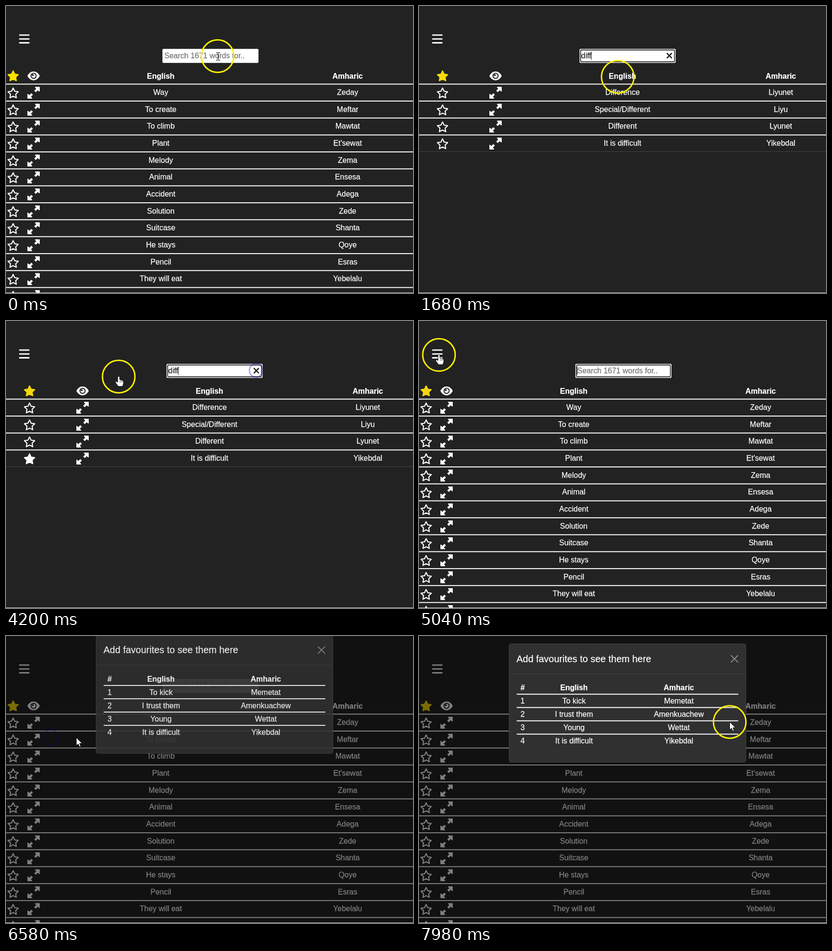
Animation of 856x604 px, one loop 8000 ms. Source, as an HTML page with a canvas:

```html
<!DOCTYPE html>
<html lang="en">
<head>
<meta charset="utf-8">
<title>Word list</title>
<style>
  html, body { margin: 0; width: 100%; height: 100%; overflow: hidden; background: #222; }
  canvas { display: block; }
</style>
</head>
<body>
<canvas id="stage" width="856" height="604"></canvas>
<script>
const c = document.getElementById('stage').getContext('2d');
const LOOP = 8000, STEP = 140, ROW = 35.67, FONT = '"Liberation Sans", Arial, sans-serif';

const allWords = [
  ['Way', 'Zeday'], ['To create', 'Meftar'], ['To climb', 'Mawtat'], ['Plant', "Et'sewat"],
  ['Melody', 'Zema'], ['Animal', 'Ensesa'], ['Accident', 'Adega'], ['Solution', 'Zede'],
  ['Suitcase', 'Shanta'], ['He stays', 'Qoye'], ['Pencil', 'Esras'], ['They will eat', 'Yebelalu'], ['', '']
];
const foundWords = [
  ['Difference', 'Liyunet'], ['Special/Different', 'Liyu'], ['Different', 'Lyunet'], ['It is difficult', 'Yikebdal']
];
const favourites = [
  ['To kick', 'Memetat'], ['I trust them', 'Amenkuachew'], ['Young', 'Wettat'], ['It is difficult', 'Yikebdal']
];
const menuItems = ['Hide Favourites', 'Hide Expander', 'Add Words', 'Favourites', 'Random Word', 'Quiz'];

// Column centres: star, expander, English, Amharic
const wide = [15, 58, 325.5, 718.5], narrow = [49.5, 161, 428, 761];

// Pointer path: time, x, y
const path = [
  [0, 445, 105.5], [140, 445, 105.5], [420, 447, 121], [700, 447, 121], [1120, 418, 149], [1680, 418, 149],
  [2000, 330, 110], [2380, 70, 240], [2600, 53, 284], [2660, 53, 284], [2800, 60, 271], [3100, 200, 180],
  [3640, 500, 83], [3900, 526, 104], [4060, 526, 104], [4200, 237, 117], [4620, 60, 80], [4900, 42, 73],
  [5240, 42, 69], [5400, 42, 72], [5740, 73, 191], [6020, 90, 212], [6220, 94, 214], [6400, 94, 214],
  [6580, 148, 214], [7000, 520, 230], [7280, 640, 190], [7980, 653.5, 181], [8000, 653.5, 181]
];
// Clicks: time, x, y, how long the yellow ring stays hidden
const clicks = [[2600, 53, 286, 200], [3970, 526, 104, 160], [5240, 42, 69, 160], [6220, 94, 214, 480]];
// Pointer shapes: start time, name
const shapes = [[0, 'beam'], [2100, 'hand'], [2850, 'arrow'], [3600, 'hand'], [4340, 'arrow'],
  [4880, 'hand'], [5400, 'beam'], [6400, 'arrow']];

const handShape = new Path2D('M-2 1.5a2 2 0 0 1 4 0v5l6 1.5q2 .8 2 3v4l-2 5.5h-9l-5-7q-1.5-2 0-3t4 1.5z');
const arrowShape = new Path2D('M0 0V16.5L3.8 13 6.4 19 9.2 17.8 6.6 12H12z');

const clamp = v => Math.max(0, Math.min(1, v));

function text(s, x, y, { color = '#fff', size = 16, bold = false, align = 'center' } = {}) {
  c.font = `${bold ? 'bold ' : ''}${size}px ${FONT}`;
  c.textAlign = align;
  c.fillStyle = c.strokeStyle = color;
  c.lineWidth = .25;
  c.fillText(s, x, y);
  c.strokeText(s, x, y);
}

function rect(x, y, w, h, color) {
  c.fillStyle = color;
  c.fillRect(x, y, w, h);
}

function box(x, y, w, h, r, fill, line) {
  c.beginPath();
  c.roundRect(x, y, w, h, r);
  if (fill) { c.fillStyle = fill; c.fill(); }
  if (line) { c.strokeStyle = line; c.stroke(); }
}

function disc(x, y, r, color) {
  c.beginPath();
  c.arc(x, y, r, 0, 7);
  c.fillStyle = color;
  c.fill();
}

function ring(x, y, r, color, width) {
  c.beginPath();
  c.arc(x, y, r, 0, 7);
  c.lineWidth = width;
  c.strokeStyle = color;
  c.stroke();
}

function cross(x, y, r, color, width) {
  c.beginPath();
  c.moveTo(x - r, y - r); c.lineTo(x + r, y + r);
  c.moveTo(x + r, y - r); c.lineTo(x - r, y + r);
  c.lineWidth = width;
  c.strokeStyle = color;
  c.stroke();
}

function star(x, y, color, filled) {
  c.beginPath();
  for (let i = 0; i < 10; i++) {
    const r = i % 2 ? 5.7 : 11.4, a = i * Math.PI / 5;
    c.lineTo(x + r * Math.sin(a), y - r * Math.cos(a));
  }
  c.closePath();
  c.lineJoin = 'round';
  c.lineWidth = 2.2;
  c.strokeStyle = c.fillStyle = color;
  c.stroke();
  if (filled) c.fill();
}

function eye(x, y) {
  c.beginPath();
  c.moveTo(x - 13, y);
  c.bezierCurveTo(x - 7, y - 12.5, x + 7, y - 12.5, x + 13, y);
  c.bezierCurveTo(x + 7, y + 12.5, x - 7, y + 12.5, x - 13, y);
  c.fillStyle = '#fff';
  c.fill();
  disc(x, y, 6.5, '#222');
  disc(x, y, 4.4, '#fff');
  disc(x - 1.6, y - 1.6, 2, '#222');
}

function expander(x, y) {
  c.strokeStyle = c.fillStyle = '#fff';
  c.lineJoin = 'round';
  for (const s of [1, -1]) {
    c.save();
    c.translate(x, y);
    c.scale(s, s);
    c.beginPath();
    c.moveTo(12, -11.5); c.lineTo(4, -11.5); c.lineTo(12, -3.5);
    c.closePath();
    c.lineWidth = 2;
    c.fill();
    c.stroke();
    c.beginPath();
    c.moveTo(9, -8.5); c.lineTo(3, -2.7);
    c.lineWidth = 4.6;
    c.stroke();
    c.restore();
  }
}

function drawTable(t, found) {
  const [sx, ex, en, am] = found ? narrow : wide;
  const gold = t < 1400 ? '#ffe100' : t < 2240 ? '#f7da0a' : t < 3400 ? '#eec822' : '#f4d70c';
  star(sx, 148, gold, true);
  eye(ex, 147);
  text('English', en, 152.5, { bold: true });
  text('Amharic', am, 152.5, { bold: true });
  (found ? foundWords : allWords).forEach(([a, b], i) => {
    const y = i * ROW;
    rect(0, 163.4 + y, 856, 2, '#fff');
    star(sx, 184 + y, '#fff', found && i === 3 && t >= 2600);
    expander(ex, 182.5 + y);
    text(a, en, 187 + y);
    text(b, am, 187 + y);
  });
  if (found) rect(0, 306, 856, 1, '#444');
}

function drawSearch(t, found, query) {
  const x = found ? 337.7 : 329;
  const focus = (t >= 280 && t < 2600) || (t >= 3970 && t < 5240);
  box(x, 90.2, 202, 29.6, 2, '#fff');
  if (focus) {
    c.lineWidth = 1.6;
    box(x + 2.3, 92.6, 197.4, 24.8, 2, null, '#181818');
  }
  if (query) text(query, x + 3.3, 110, { color: '#222', align: 'left' });
  else text('Search 1671 words for..', x + 4, 110, { color: '#757575', align: 'left' });
  if (focus && !(t >= 1400 && t < 1680)) rect(x + 3.3 + c.measureText(query).width, 96, 1, 17, '#000');
  if (query && (focus || t > 3500)) cross(x + 188.8, 104.5, 5.3, '#111', 2.4);
}

function drawMenu(hover) {
  c.lineWidth = 1;
  box(-4.5, 92.5, 158, 208, 4, '#222', '#3c3c3c');
  rect(0, 165 + (hover - 2) * 32, 153, 32, '#465a7d');
  menuItems.forEach((s, i) => text(s, 10.5, 122 + i * 32, { align: 'left' }));
}

function drawModal(age) {
  c.save();
  c.globalAlpha = clamp(age / 135);
  c.translate(0, -50 * (1 - clamp(age / 300)) ** 2);
  c.lineWidth = 1;
  box(189.5, 16.5, 498, 249, 4, '#303030', '#444');
  rect(190, 79, 497, 1, '#404040');
  text('Add favourites to see them here', 205, 54.5, { size: 20, align: 'left' });
  cross(663.5, 48, 7.5, '#8c8c8c', 2);
  [['#', 'English', 'Amharic'], ...favourites.map((f, i) => [i + 1, ...f])].forEach((cells, i) => {
    const y = 114 + i * 28;
    cells.forEach((s, k) => text(s, [218, 326, 546.5][k], y, { bold: !i }));
    if (i < 4) rect(205.5, y + 7.5, 466, 2, '#fff');
  });
  c.restore();
}

function pointerAt(t) {
  const i = path.findIndex(p => p[0] > t);
  const [t0, x0, y0] = path[i - 1], [t1, x1, y1] = path[i];
  const p = (t - t0) / (t1 - t0);
  return [x0 + (x1 - x0) * p, y0 + (y1 - y0) * p];
}

function drawPointer(t) {
  const [x, y] = pointerAt(t);
  let hidden = false;
  for (const [at, cx, cy, hide] of clicks) {
    const age = t - at;
    if (age < 0 || age > 560) continue;
    ring(cx, cy, 9 + age * .022, `rgba(0,0,185,${.95 * Math.exp(-age / 220)})`, 3);
    if (age < hide) hidden = true;
  }
  if (!hidden) ring(x, y, 34.2, '#fff200', 3);

  const shape = shapes.filter(s => s[0] <= t).pop()[1];
  c.save();
  c.translate(x, y);
  c.lineWidth = 1;
  c.fillStyle = '#fff';
  c.strokeStyle = '#111';
  if (shape === 'beam') {
    rect(.5, -7, 1.4, 15, '#111');
    for (const dy of [-8, 8]) {
      rect(-3, dy, 3.5, 1.2, '#111');
      rect(2, dy, 3.5, 1.2, '#111');
    }
  } else {
    const p = shape === 'hand' ? handShape : arrowShape;
    c.fill(p);
    c.stroke(p);
    if (shape === 'hand') for (const fx of [2, 4.5, 7]) rect(fx, 8.5, .8, 4, '#444');
  }
  c.restore();
}

function draw(t) {
  const query = t < 4340 ? 'diff'.slice(0, Math.max(0, Math.floor((t - 560) / STEP))) : '';
  const found = query.length > 2;
  rect(0, 0, 856, 604, '#222');
  for (const y of [59.7, 67.9, 76.1]) box(27.5, y, 22, 2.9, 1, '#fff');
  drawTable(t, found);
  drawSearch(t, found, query);
  if (t >= 5320 && t < 6300) drawMenu(t < 5600 ? 0 : t < 5700 ? 1 : t < 5900 ? 2 : 3);
  if (t >= 6400) rect(0, 0, 856, 604, `rgba(0,0,0,${.5 * clamp((t - 6400) / 150)})`);
  if (t >= 6462) drawModal(t - 6462);
  drawPointer(t);
  rect(0, 603, 856, 1, '#ddd');
}

function tick() {
  const t = performance.now() % LOOP;
  draw(Math.floor(t / STEP) * STEP);
  requestAnimationFrame(tick);
}
tick();
</script>
</body>
</html>
```
